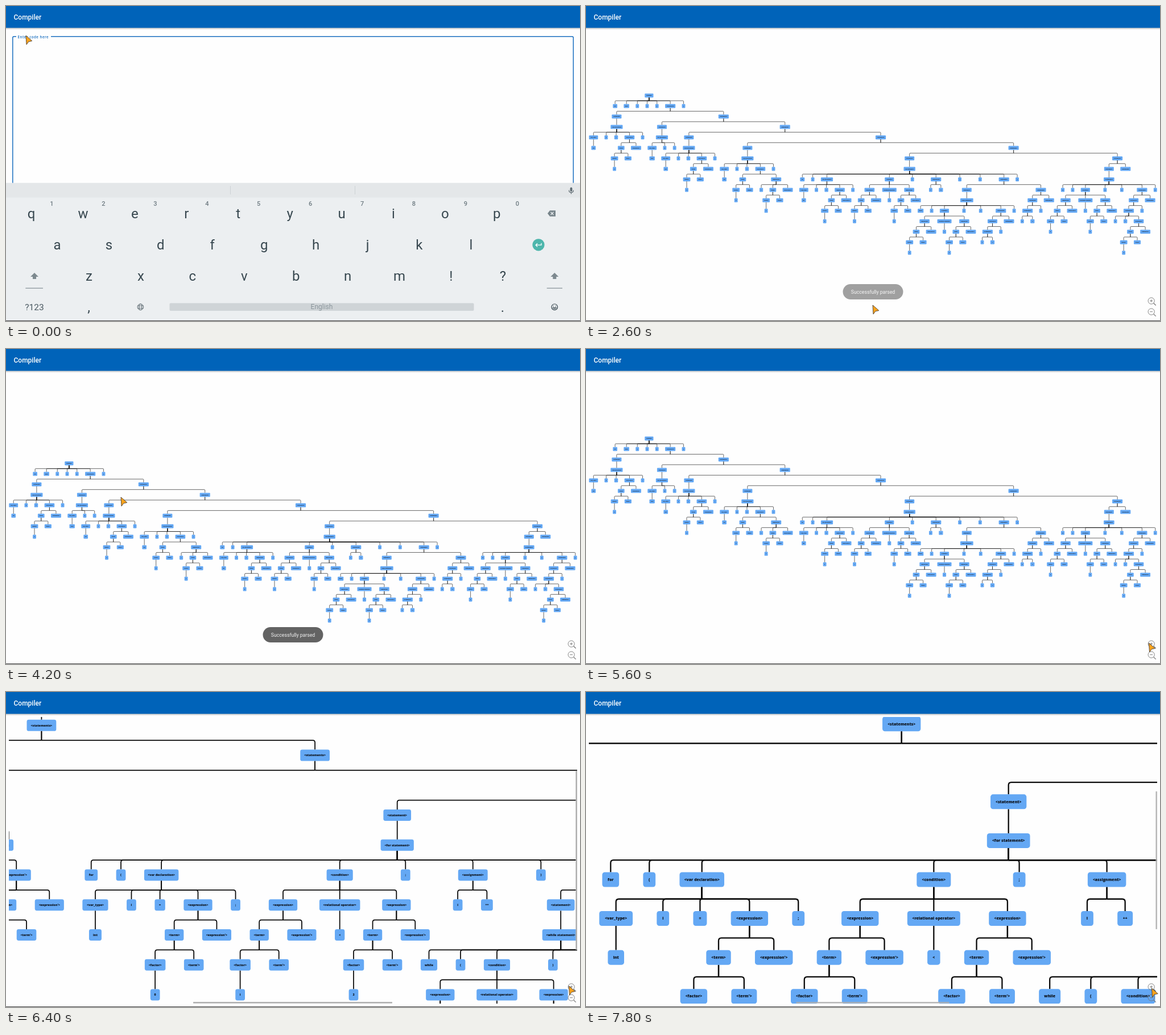
These frames come from a looping animation (1009x555 px, 8000 ms). An HTML page:

```html
<!DOCTYPE html>
<html lang="en">
<head>
<meta charset="utf-8">
<title>Compiler</title>
<style>
  html, body { margin: 0; width: 100%; height: 100%; overflow: hidden; background: #fefefe; }
  svg { display: block; }
  text { font-family: Roboto, sans-serif; white-space: pre; }
  .label, .cta, #tree text { font-family: "Open Sans", "Noto Sans", sans-serif; }
  .label { font-size: 6.2px; font-weight: 600; letter-spacing: .5px; fill: #1a6fc0; }
  .cta { font-size: 7.2px; font-weight: 800; letter-spacing: .75px; fill: #fff; }
  #code text { font-size: 9.4px; fill: #161616; }
  #tree text { font-size: 6.9px; font-weight: 800; fill: #0c1118; text-anchor: middle; }
  #tree rect { fill: #64a8f4; }
  #tree path { fill: none; stroke: #0a0a0a; stroke-width: 2.3; }
  .key { font-size: 24px; fill: #37474f; text-anchor: middle; }
  .digit { font-size: 11px; font-weight: 500; fill: #6d7a81; text-anchor: middle; }
  .line { fill: none; stroke: #5f6c73; }
</style>
</head>
<body>
<svg id="stage" width="1009" height="555" viewBox="0 0 1009 555">
  <defs>
    <linearGradient id="shade" x2="0" y2="1">
      <stop stop-color="#000" stop-opacity=".26"/><stop offset="1" stop-color="#000" stop-opacity="0"/>
    </linearGradient>
    <g id="lens" fill="none" stroke="#757575" stroke-width=".9">
      <circle r="5.6"/><path d="M4 4L8 8" stroke-width="1.2"/><path d="M-2.4 0H2.4"/>
    </g>
    <path id="shift" d="M0 -6L7 1H3V5H-3V1H-7Z" fill="#7d898f"/>
  </defs>
  <rect width="1009" height="555" fill="#fefefe"/>

  <g id="form">
    <path d="M79 53.7H995Q997.3 53.7 997.3 56V511.5Q997.3 513.8 995 513.8H14Q11.8 513.8 11.8 511.5V56Q11.8 53.7 14 53.7H18"
      fill="none" stroke="#1a6fc0" stroke-width="1.5"/>
    <text class="label" x="20.5" y="56.8">Enter code here</text>
    <g id="code"></g>
    <rect x="454" y="519" width="101" height="21" rx="3" fill="#000" opacity=".16"/>
    <rect x="454" y="517.5" width="101" height="20.5" rx="2.5" fill="#0f6ec4"/>
    <text class="cta" x="504.8" y="530.2" text-anchor="middle">Create Parse Tree</text>
  </g>

  <svg id="tree" x="5" y="44" width="999" height="505"><g id="graph"></g></svg>
  <g id="bars" fill="#b0b0b0">
    <rect id="hbar" y="546" height="2.6"/><rect id="vbar" x="1001.4" width="2.6"/>
  </g>
  <use href="#lens" x="993.7" y="519.5"/><path d="M993.7 517.1V521.9" stroke="#757575" stroke-width=".9"/>
  <use href="#lens" x="993.7" y="538.6"/>

  <g id="toast">
    <rect x="451.5" y="490" width="106" height="27" rx="13.5" fill="#636363"/>
    <text x="504.5" y="507.2" font-size="8.7" fill="#f2f2f2" text-anchor="middle">Successfully parsed</text>
  </g>

  <rect y="38" width="1009" height="4" fill="url(#shade)"/>
  <rect width="1009" height="38.5" fill="#0063b9"/>
  <text x="13.5" y="23.8" font-size="12" font-weight="500" fill="#fff">Compiler</text>

  <g id="board">
    <rect y="311.8" width="1009" height="260" fill="#eceff1"/>
    <rect y="311.8" width="1009" height="25.7" fill="#e4e7e9"/>
    <path d="M394.5 317V332M613.5 317V332" stroke="#cdd2d5"/>
    <rect x="991.6" y="319.5" width="3.8" height="7.4" rx="1.9" fill="#5f6c73"/>
    <path class="line" d="M989.6 324.5Q989.6 328.6 993.5 328.6T997.4 324.5M993.5 328.6V331.2" stroke-width="1.2"/>
    <path d="M952 365.5L956 360.3H966V370.7H956Z" fill="#78858b"/>
    <path d="M957.5 363L962.5 368M962.5 363L957.5 368" stroke="#eceff1" stroke-width="1.3"/>
    <circle cx="936" cy="420.8" r="10.6" fill="#4db6ac"/>
    <path d="M941 417.8V421.2H931.5M934.2 418.2L931.2 421.2L934.2 424.2" fill="none" stroke="#fff" stroke-width="1.3"/>
    <use href="#shift" x="50" y="476"/><use href="#shift" x="964.3" y="476"/>
    <path d="M34.3 497.3H65M950.7 497.3H978" stroke="#98a2a7" stroke-width="1.5"/>
    <text x="50" y="536" font-size="15.5" fill="#4b5a62" text-anchor="middle">?123</text>
    <g class="line" transform="translate(236.4 530.3)">
      <circle r="5.3"/><ellipse rx="2.4" ry="5.3"/><path d="M-4.8 -2H4.8M-4.8 2H4.8"/>
    </g>
    <rect x="287.5" y="523.5" width="535" height="13.6" rx="2" fill="#cfd4d7"/>
    <text x="555" y="534.3" font-size="12" fill="#8a959b" text-anchor="middle">English</text>
    <g transform="translate(964.3 530.3)" fill="none" stroke="#37474f" stroke-width="1.2">
      <circle r="5.3"/><path d="M-2.8 1.2Q0 5 2.8 1.2Z"/><path d="M-2 -2.4V-.8M2 -2.4V-.8"/>
    </g>
  </g>

  <rect y="554" width="1009" height="1" fill="#4a4a4a"/>
  <path id="cursor" d="M0 0L10.8 9.6L4.8 10.8L1 16Z" fill="#fba31c" stroke="#4a4038" stroke-width=".9" stroke-linejoin="round"/>
</svg>

<script>
const $ = id => document.getElementById(id);
const add = (parent, tag, attrs, text = '') => {
  const e = document.createElementNS('http://www.w3.org/2000/svg', tag);
  for (const a in attrs) e.setAttribute(a, attrs[a]);
  e.textContent = text;
  parent.appendChild(e);
};

// Code listing
`int main(){
int a=3;
float b;
int c=7;
int d=a+c;
for(int i=0;i<3;i++){
    while(c<4){
    c++;
    }
    d++;
}

if(a>5){
 a = 2;
}

}`.split('\n').forEach((s, i) => add($('code'), 'text', { x: 20.5, y: 73.9 + i * 11.04 }, s));

// Keyboard letters
const keyRow = (chars, x, y, cls = 'key') => [...chars].forEach((c, i) =>
  add($('board'), 'text', { class: cls, x: x + i * 90.92, y }, c));
keyRow('qwertyuiop', 44.5, 374.3);
keyRow('1234567890', 80.5, 352.2, 'digit');
keyRow('asdfghjkl', 90, 429);
keyRow('zxcvbnm!?', 146, 483.8);
keyRow(',', 145.5, 538.5);
keyRow('.', 872.8, 538.5);

// Parse tree
const ZOOM = 1.3 ** 5, GAP = 42.4, ROW = 68.57, BOX = 26;
const WIDTHS = {
  '<program>': 56.5, '<statements>': 67.3, '<statement>': 63.3, '<for statement>': 75.7,
  '<while statement>': 84.5, '<if statement>': 69, '<var declaration>': 78.6, '<condition>': 60,
  '<assignment>': 67.5, '<var_type>': 58.8, '<expression>': 65.4, "<expression'>": 66.5,
  '<relational operator>': 93, '<term>': 43.4, "<term'>": 45, '<factor>': 47.5,
  for: 29.6, while: 38, if: 23, int: 28.6, float: 35, main: 35.5, '=': 24, '++': 27, '+': 23, '<': 22.5, '>': 22.5
};
const node = (label, ...kids) => {
  const n = { label, w: WIDTHS[label] || 21.8, x: 0, mod: 0, shift: 0, change: 0 };
  n.anc = n;
  n.kids = kids.map(k => k.label ? k : node(k));
  n.kids.forEach((k, i) => { k.i = i; k.parent = n; k.left = n.kids[i - 1]; });
  return n;
};
const term = v => node('<term>', node('<factor>', v), "<term'>");
const expr = (v, rest = "<expression'>") => node('<expression>', term(v), rest);
const declare = (type, name, ...init) =>
  node('<statement>', node('<var declaration>', ...declParts(type, name, ...init)));
const declParts = (type, name, ...init) => [node('<var_type>', type), name, ...init, ';'];
const cond = (a, op, b) => node('<condition>', expr(a), node('<relational operator>', op), expr(b));
const assign = (...parts) => node('<assignment>', ...parts);
const statement = (...kids) => node('<statement>', ...kids);
const list = (first, ...rest) => first ? node('<statements>', first, list(...rest)) : node('<statements>');

const whileLoop = node('<while statement>', 'while', '(', cond('c', '<', '4'), ')', '{',
  list(statement(assign('c', '++'), ';')), '}');
const forLoop = node('<for statement>', 'for', '(',
  node('<var declaration>', ...declParts('int', 'i', '=', expr('0'))),
  cond('i', '<', '3'), ';', assign('i', '++'), ')', '{',
  list(statement(whileLoop), statement(assign('d', '++'), ';')), '}');
const branch = node('<if statement>', 'if', '(', cond('a', '>', '5'), ')', '{',
  list(statement(assign('a', '=', expr('2')), ';')), '}');
const root = node('<program>', 'int', 'main', '(', ')', '{', list(
  declare('int', 'a', '=', expr('3')),
  declare('float', 'b'),
  declare('int', 'c', '=', expr('7')),
  declare('int', 'd', '=', expr('a', node("<expression'>", '+', term('c'), "<expression'>"))),
  statement(forLoop), statement(branch)), '}');

// Buchheim-Walker layout
const nextL = n => n.kids[0] || n.thread;
const nextR = n => n.kids[n.kids.length - 1] || n.thread;

function apportion(n, fallback) {
  if (!n.left) return fallback;
  let ir = n, or = n, il = n.left, ol = n.parent.kids[0];
  let sir = ir.mod, sor = or.mod, sil = il.mod, sol = ol.mod;
  let r = nextR(il), l = nextL(ir);
  while (r && l) {
    il = r; ir = l; ol = nextL(ol); or = nextR(or);
    or.anc = n;
    const push = il.x + sil + il.w + GAP - ir.x - sir;
    if (push > 0) {
      const from = il.anc.parent === n.parent ? il.anc : fallback;
      const share = push / (n.i - from.i);
      n.change -= share; n.shift += push; from.change += share;
      n.x += push; n.mod += push;
      sir += push; sor += push;
    }
    sil += il.mod; sir += ir.mod; sol += ol.mod; sor += or.mod;
    r = nextR(il); l = nextL(ir);
  }
  if (r && !nextR(or)) { or.thread = r; or.mod += sil - sor; }
  if (l && !nextL(ol)) { ol.thread = l; ol.mod += sir - sol; fallback = n; }
  return fallback;
}

function arrange(n) {
  const slot = n.left ? n.left.x + n.left.w + GAP : 0;
  if (!n.kids.length) { n.x = slot; return; }
  let fallback = n.kids[0];
  for (const k of n.kids) { arrange(k); fallback = apportion(k, fallback); }
  let shift = 0, change = 0;
  for (const k of [...n.kids].reverse()) {
    k.x += shift; k.mod += shift;
    change += k.change; shift += k.shift + change;
  }
  const first = n.kids[0], last = n.kids[n.kids.length - 1];
  const mid = (first.x + last.x + last.w - n.w) / 2;
  n.x = n.left ? slot : mid;
  n.mod = n.left ? slot - mid : 0;
}

const nodes = [];
function place(n, depth, offset) {
  n.cx = n.x + offset + n.w / 2;
  n.y = (depth - 7.5) * ROW;
  nodes.push(n);
  n.kids.forEach(k => place(k, depth + 1, offset + n.mod));
}
arrange(root);
place(root, 0, 0);

// Fit the tree to the width of the view
const lo = Math.min(...nodes.map(n => n.cx - n.w / 2));
const hi = Math.max(...nodes.map(n => n.cx + n.w / 2));
for (const n of nodes) n.cx = (n.cx - (lo + hi) / 2) * 998.4 * ZOOM / (hi - lo);

for (const n of nodes) for (const k of n.kids) {
  const dx = n.cx - k.cx, my = k.y - ROW / 2, r = Math.min(5, Math.abs(dx));
  const start = `M${k.cx} ${k.y - BOX / 2}`, end = `V${n.y + BOX / 2}`;
  add($('graph'), 'path', { d: r < 1 ? start + end :
    `${start}V${my + r}Q${k.cx} ${my} ${k.cx + Math.sign(dx) * r} ${my}H${n.cx}M${n.cx} ${my}${end}` });
}
for (const n of nodes) {
  add($('graph'), 'rect', { x: n.cx - n.w / 2, y: n.y - BOX / 2, width: n.w, height: BOX, rx: 4.5 });
  add($('graph'), 'text', { x: n.cx, y: n.y + 2.3 }, n.label);
}

// Timeline: each key is [time, ...values]
const LOOP = 8000, STEP = 200;
const POINTER = [[0, 35, 52], [400, 60, 62], [600, 120, 95], [1200, 442, 240], [2000, 478, 400],
  [2400, 504, 527], [2800, 504, 527], [3200, 470, 370], [3400, 457, 341], [3600, 370, 290],
  [3800, 215, 225], [4000, 204, 239], [4200, 202, 261], [4400, 203, 277], [4800, 203, 217],
  [5000, 300, 290], [5400, 930, 540], [5600, 989.5, 518], [7200, 989.5, 518], [7800, 994.5, 522]];
const DRAG = [[3800, 0], [4000, 22], [4200, 43.8], [4400, 60], [4800, 0]];
const SCALE = [[5800, 1], [6000, 1.37], [6200, 2], [6400, 1.3 ** 4], [6600, 3.3], [6800, 3.6], [7000, ZOOM]];
const BOARD = [[1400, 1, 0], [1600, .71, 11.3], [1800, .25, 28], [2000, 0, 38]];
const TOAST = [[2400, 0], [2600, .6], [2800, 1], [4400, 1], [4600, .5], [4800, 0]];
const BARS = [[7200, 1], [7800, .88]];

function at(keys, t) {
  const j = keys.findIndex(k => k[0] > t);
  if (j < 1) return (j ? keys[keys.length - 1] : keys[0]).slice(1);
  const a = keys[j - 1], b = keys[j], u = (t - a[0]) / (b[0] - a[0]);
  return a.slice(1).map((v, i) => v + (b[i + 1] - v) * u);
}
const set = (id, name, v) => $(id).setAttribute(name, v);
const show = (id, on) => set(id, 'visibility', on ? 'visible' : 'hidden');

function draw(t) {
  const [scale] = at(SCALE, t), [drag] = at(DRAG, t), [alpha, drop] = at(BOARD, t);
  show('form', t < 2600);
  show('code', t >= 600 && t < 2600);
  show('tree', t >= 2600);
  show('cursor', t < 1400 || t >= 2000);
  show('bars', scale > 1);
  set('graph', 'transform', `translate(499.5 ${252.2 + drag}) scale(${scale / ZOOM})`);
  set('board', 'opacity', alpha);
  set('board', 'transform', `translate(0 ${drop})`);
  set('toast', 'opacity', at(TOAST, t)[0]);
  set('cursor', 'transform', `translate(${at(POINTER, t)})`);
  set('bars', 'opacity', at(BARS, t)[0]);
  const wide = 999 / scale, tall = 505 * 505 / (283 * scale);
  set('hbar', 'x', 504 - wide / 2);
  set('hbar', 'width', wide);
  set('vbar', 'y', 296.5 - tall / 2);
  set('vbar', 'height', tall < 505 ? tall : 0);
}

const start = performance.now();
function tick() {
  const t = (performance.now() - start) % LOOP;
  draw(Math.floor(t / STEP) * STEP);
  requestAnimationFrame(tick);
}
tick();
</script>
</body>
</html>
```
